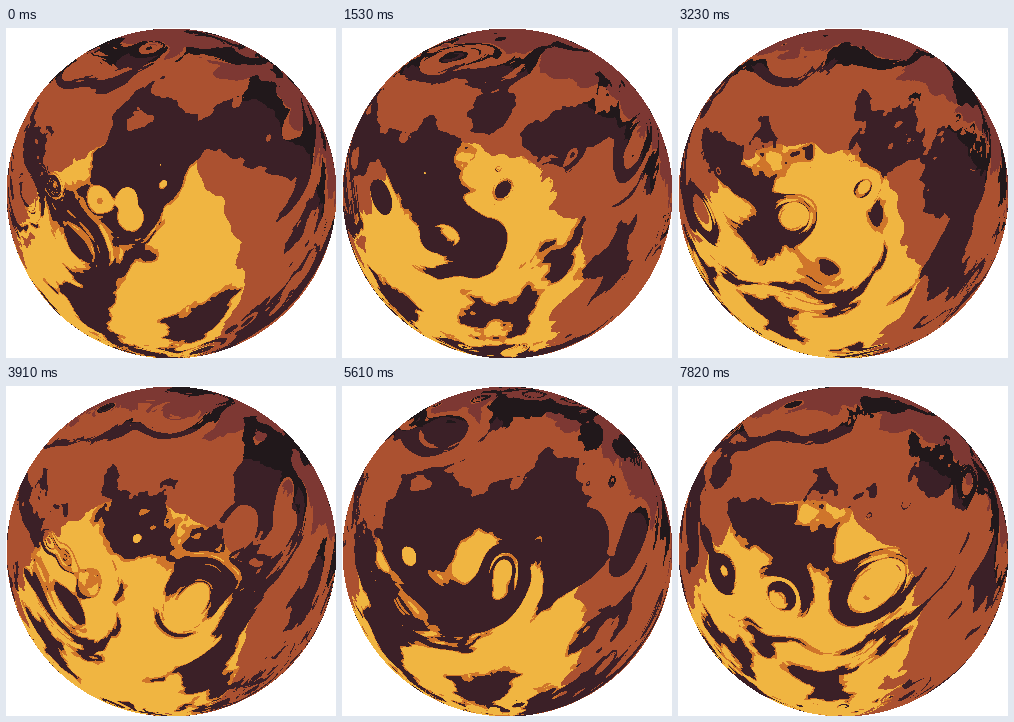
Write an HTML page with a canvas that moves like this. It is 330 px wide and 330 px high and loops after 7990 ms.

```html
<!DOCTYPE html>
<html lang="en">
<head>
<meta charset="utf-8">
<title>Gas planet</title>
<style>
  html, body { margin: 0; width: 100%; height: 100%; overflow: hidden; background: #fff; }
  canvas { display: block; width: 100vw; height: 100vh; image-rendering: pixelated; }
</style>
</head>
<body>
<canvas id="stage" width="330" height="330"></canvas>
<script>
const SIZE = 330, STEP_MS = 170, STEPS = 47, DRIFT = 0.3;
const GRID = 9, SEED = 8.45, OCTAVES = 5, SWIRLS = 9;
const CLOUD_COVER = 0.372, RIM = 0.03, CURVE = 1.3;
const LIGHT = { x: 0.378, y: 0.705 };

// Canvas pixels are stored as ABGR.
const abgr = rgb => (0xff000000 | (rgb & 255) << 16 | (rgb & 0xff00) | rgb >> 16) >>> 0;
const [GOLD, ORANGE, RUST, MAROON, PLUM, BLACK] =
  [0xf0b541, 0xcf752b, 0xab5130, 0x7d3833, 0x3b2027, 0x21181b].map(abgr);

const fract = n => n - Math.floor(n);
const smooth = t => t * t * (3 - 2 * t);

// Seeded random values on a lattice that repeats every GRID cells.
const lattice = Float64Array.from({ length: GRID * GRID }, (_, i) =>
  fract(Math.sin((i % GRID) * 12.9898 + Math.floor(i / GRID) * 78.233) * 15.5453 * SEED));

function noise(x, y) {
  const ix = Math.floor(x), iy = Math.floor(y);
  const sx = smooth(x - ix), sy = smooth(y - iy);
  const x0 = ix % GRID, x1 = (ix + 1) % GRID;
  const row0 = iy % GRID * GRID, row1 = (iy + 1) % GRID * GRID;
  const top = lattice[row0 + x0] * (1 - sx) + lattice[row0 + x1] * sx;
  const bottom = lattice[row1 + x0] * (1 - sx) + lattice[row1 + x1] * sx;
  return top + (bottom - top) * sy;
}

function fbm(x, y) {
  let value = 0, scale = 0.5;
  for (let i = 0; i < OCTAVES; i++) {
    value += noise(x, y) * scale;
    x *= 2;
    y *= 2;
    scale /= 2;
  }
  return value;
}

// 1 outside a cell's circle, falling smoothly to 0 at its centre.
function circleNoise(x, y) {
  const iy = Math.floor(y);
  x += iy * 0.31;
  const ix = Math.floor(x);
  const h = lattice[iy % GRID * GRID + ix % GRID];
  const centre = 0.25 + h * 0.5, radius = h / 3;
  const dx = x - ix - centre, dy = y - iy - centre;
  const d2 = dx * dx + dy * dy;
  return d2 >= radius * radius ? 1 : smooth(Math.sqrt(d2) / radius);
}

function cloudDensity(u, v, drift) {
  const x = u * GRID, y = v * GRID;
  let swirl = 0;
  for (let i = 0; i < SWIRLS; i++) {
    swirl += circleNoise(x * 0.3 + i + 11 + drift, y * 0.3 + i + 11);
  }
  return fbm(x + swirl + drift, y + swirl);
}

function shade(density, distance) {
  const shadow = distance + density * 0.2;
  if (density < CLOUD_COVER) return shadow > 0.666 ? BLACK : PLUM;
  if (shadow > 0.746) return MAROON;
  if (shadow > 0.439) return RUST;
  return density < CLOUD_COVER + RIM ? ORANGE : GOLD;
}

// Sphere coordinates and light distance for every pixel on the disc.
const disc = [];
for (let py = 0; py < SIZE; py++) {
  for (let px = 0; px < SIZE; px++) {
    const x = px / SIZE, y = py / SIZE;
    const cx = x * 2 - 1, cy = y * 2 - 1, r2 = cx * cx + cy * cy;
    if (r2 >= 1) continue;
    const bulge = 2 * (1 + Math.sqrt(1 - r2));
    const u = cx / bulge + 0.5;
    const v = cy / bulge + 0.5 + smooth(Math.abs(u - 0.4) / CURVE);
    disc.push({ index: py * SIZE + px, u, v, distance: Math.hypot(x - LIGHT.x, y - LIGHT.y) });
  }
}

const ctx = document.getElementById('stage').getContext('2d');
const image = ctx.createImageData(SIZE, SIZE);
const pixels = new Uint32Array(image.data.buffer).fill(0xffffffff);
let shown = -1;

function draw() {
  const step = Math.floor(performance.now() / STEP_MS) % STEPS;
  if (step !== shown) {
    shown = step;
    for (const p of disc) {
      pixels[p.index] = shade(cloudDensity(p.u, p.v, step * DRIFT), p.distance);
    }
    ctx.putImageData(image, 0, 0);
  }
  requestAnimationFrame(draw);
}
draw();
</script>
</body>
</html>
```
